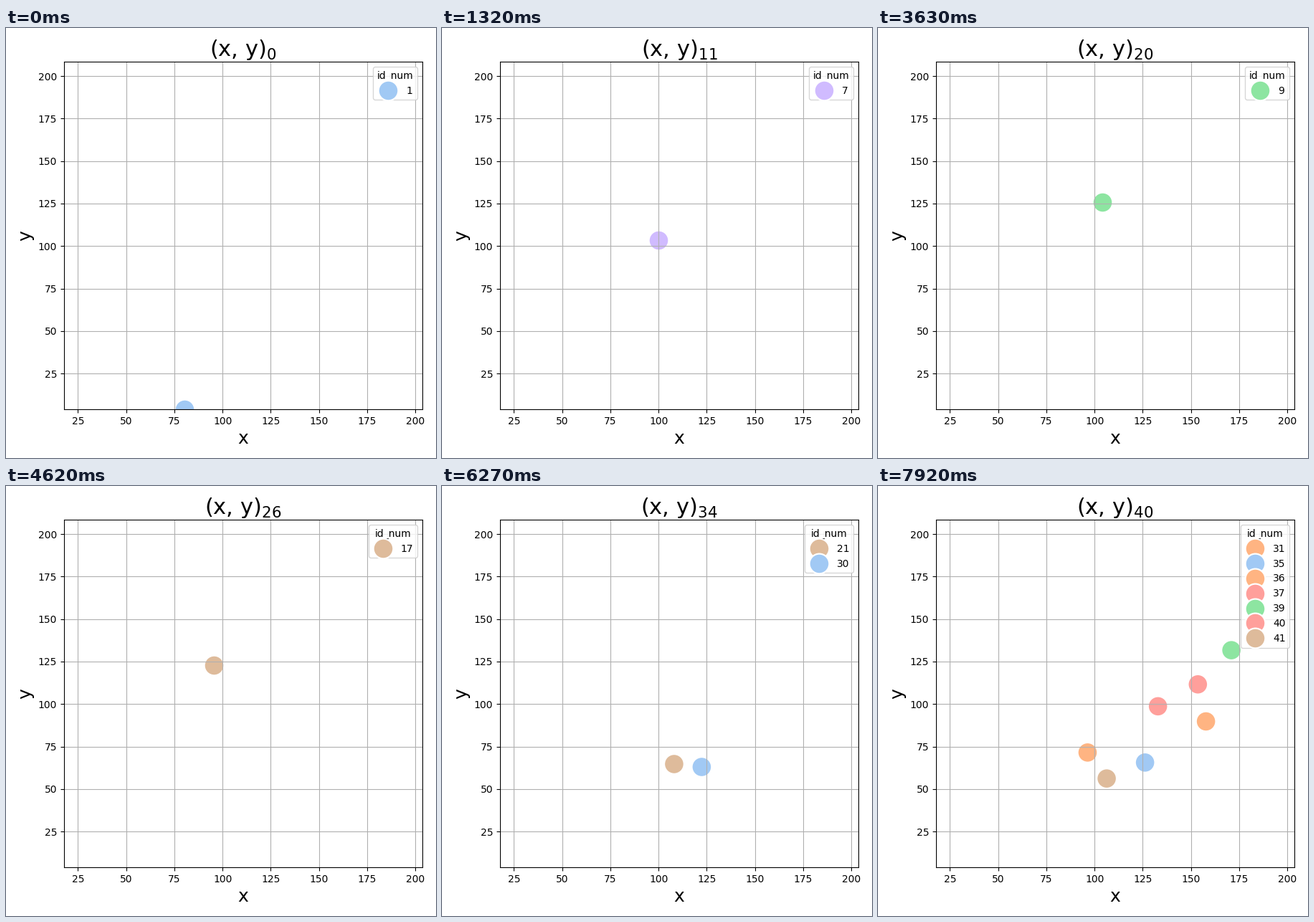
Recreate the animation shown at these times as a matplotlib script. Size 600 by 600 pixels, loop 8 s.

```python
import matplotlib.pyplot as plt
import numpy as np
from matplotlib.animation import FuncAnimation
from matplotlib.lines import Line2D

LOOP, STEP, TICK = 8000, 330, 40   # ms
LAST = LOOP // STEP
SIZE = 600
MARK = 20                          # marker diameter in points
EDGE = 0.08 * MARK
DRIFT = np.array([7.9, -2.0])      # data units per step

PALETTE = ["#a1c9f4", "#ffb482", "#8de5a1", "#ff9f9b",
           "#d0bbff", "#debb9b", "#fab0e4"]
BLUE, ORANGE, GREEN, RED, PURPLE, BROWN, PINK = range(7)

flights = []


def fly(num, hue, *keys, rate=0):
    """Move through (step, x, y) keys; with a rate the id and hue advance."""
    flights.append((num, hue, rate, np.array(keys, float).T))


def arrive(num, hue, x, y):
    """Drift in with the closing crowd and end at (x, y)."""
    first = 21 + (num - 31) // 3
    start = np.array([x, y]) - DRIFT * (LAST - first)
    fly(num, hue, (first, *start), (LAST, x, y))


fly(1, BLUE, (0, 80.4, 4), (4, 99.8, 103.6), (5, 101.8, 117.4), rate=1.5)
fly(6, RED, (3, 84.3, 46.6))
fly(9, GREEN, (6, 102.2, 126.3), (7, 101.3, 135.6), (11, 103.9, 126), (12, 99.9, 116.6))
fly(10, PINK, (7, 78.2, 109.3), (10, 93.6, 138.9), rate=1)
fly(15, RED, (12, 99.2, 137.7), (15, 93.6, 115.7), rate=1)
fly(21, BROWN, (16, 85.1, 81.6), (17, 84.8, 65.6), (19, 108.1, 64.7), (21, 107.6, 78.6))
fly(22, PINK, (17, 98.7, 115.2), (18, 106.6, 122.9))
fly(25, GREEN, (18, 50.5, 131.4))
fly(30, BLUE, (19, 122.4, 63), (22, 133.4, 82))
arrive(31, ORANGE, 157.8, 89.8)
arrive(35, BLUE, 126.2, 65.6)
arrive(36, ORANGE, 96.4, 71.5)
arrive(37, RED, 132.9, 98.7)
arrive(39, GREEN, 171, 131.7)
arrive(40, RED, 153.6, 111.6)
arrive(41, BROWN, 106.3, 56.2)


def counter(step):
    return round(np.interp(step, [0, 4, 7, 11, 17, 21, 24],
                           [0, 11, 14, 20, 32, 37, 40]))


def visible(step):
    for num, hue, rate, (s, x, y) in flights:
        if s[0] <= step <= s[-1]:
            age = int(step - s[0])
            color = PALETTE[(hue + (age if rate else 0)) % len(PALETTE)]
            yield num + int(rate * age), color, (np.interp(step, s, x), np.interp(step, s, y))


def handle(num, color):
    return Line2D([], [], ls="", marker="o", ms=MARK, mfc=color,
                  mec="white", mew=EDGE, label=str(num))


fig = plt.figure(figsize=(SIZE / 100, SIZE / 100), dpi=100)
left, bottom, right, top = (v / SIZE for v in (80.95, 68.2, 580.95, 553))
ax = fig.add_axes([left, bottom, right - left, top - bottom])
ax.set_xlim(17.77, 203.65)
ax.set_ylim(4.05, 208.5)
ticks = range(25, 201, 25)
ax.set_xticks(ticks)
ax.set_yticks(ticks)
ax.grid(True)
ax.set_xlabel("x", fontsize=18)
ax.set_ylabel("y", fontsize=18)
title = ax.set_title("", fontsize=22)
dots = ax.scatter([], [], s=MARK ** 2, edgecolors="white", linewidths=EDGE)


def draw(i):
    # a tick that holds a change already shows the new step
    step = (i * TICK + TICK - 1) // STEP
    nums, colors, points = zip(*sorted(visible(step)))
    dots.set_offsets(points)
    dots.set_facecolors(colors)
    title.set_text(f"(x, y)$_{{{counter(step)}}}$")
    ax.legend(handles=[handle(n, c) for n, c in zip(nums, colors)],
              title="id_num", loc="upper right")
    return dots, title


anim = FuncAnimation(fig, draw, frames=LOOP // TICK, interval=TICK,
                     init_func=lambda: draw(0), repeat=True, repeat_delay=0)
plt.show()
```
